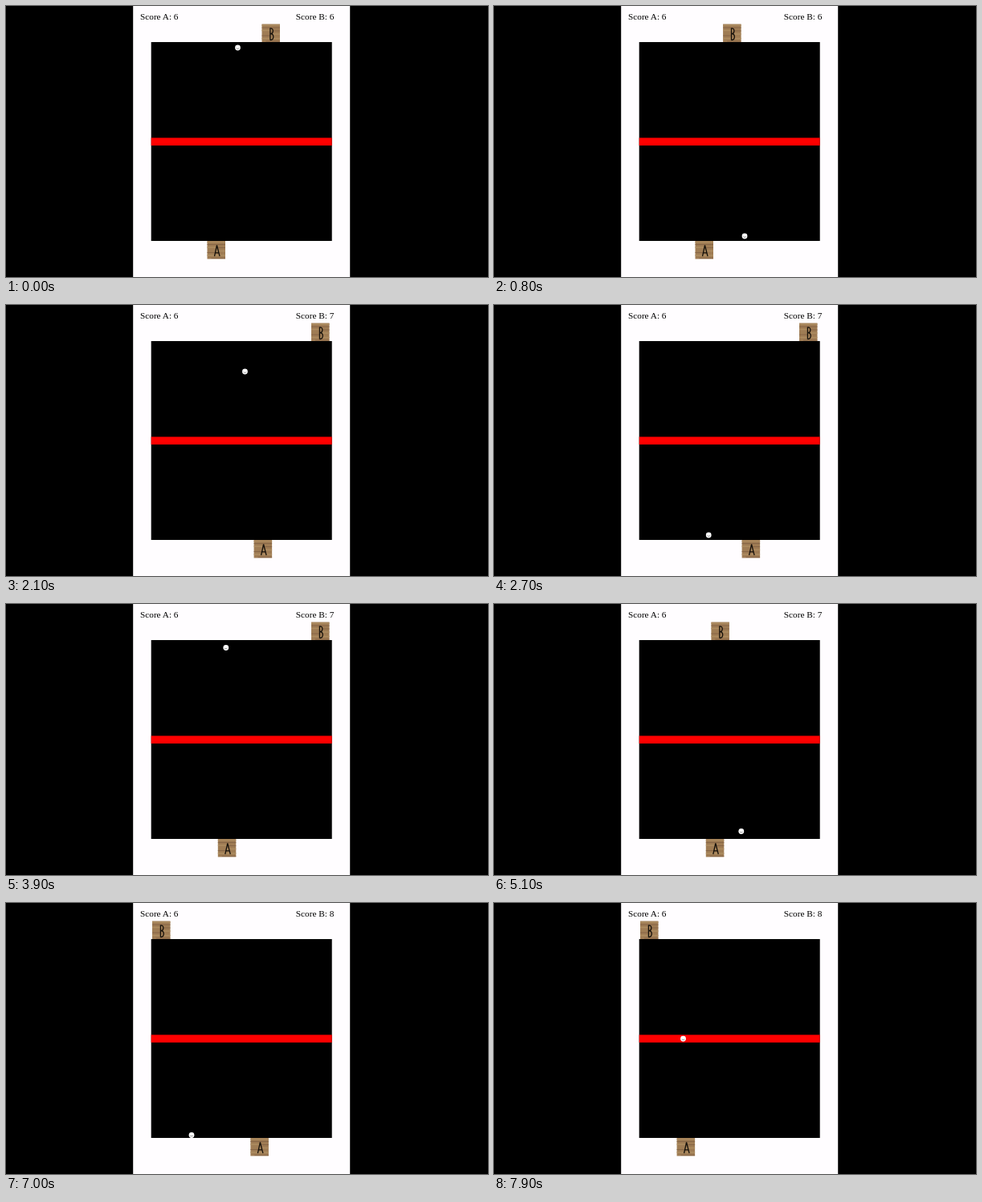
An HTML page for the animation above (8 s loop, 600x338 px).

```html
<!DOCTYPE html>
<html lang="en">
<head>
<meta charset="utf-8">
<title>Paddle game</title>
<style>
  html, body { margin: 0; height: 100%; overflow: hidden; background: #000; }
  svg { display: block; width: 100%; height: 100%; }
  text { font: 11.25px "Liberation Serif", serif; }
  .letter { fill: none; stroke: #15100a; stroke-width: 1.3; }
</style>
</head>
<body>
<svg viewBox="0 0 600 338">
  <defs>
    <g id="wood">
      <rect width="22.5" height="22.5" fill="#9f7c54"/>
      <path d="M0 1.5H22.5M0 8H13M10 12.5H22.5M0 18H22.5" stroke="#ae8d61" stroke-width="1.6"/>
      <path d="M0 4.5H22.5M12 8.5H22.5M0 14.5H10M5 21.5H22.5" stroke="#866546"/>
    </g>
  </defs>
  <rect x="158.2" width="270" height="338" fill="#fffdff"/>
  <rect x="180.7" y="45" width="225" height="248"/>
  <rect x="180.7" y="164.4" width="225" height="9.6" fill="#f00"/>
  <text x="167" y="17">Score A: 6</text>
  <text x="360.8" y="17" id="score"></text>
  <g id="tileA">
    <use href="#wood"/>
    <path class="letter" d="M9 19.2L12 5.5L15.5 19.2M10 14.8H14.5"/>
  </g>
  <g id="tileB">
    <use href="#wood"/>
    <path class="letter" d="M10.4 20V5.5C15 4.5 15 12 10.4 12C15.6 11.5 15.6 20 10.4 20"/>
  </g>
  <g id="ball">
    <circle r="3.4" fill="#fff"/>
    <path d="M-1.8 .7Q0 2.2 1.8 .7" fill="none" stroke="#777" stroke-width=".8"/>
  </g>
</svg>
<script>
const LOOP = 8000, STEP = 100, GRIP = 3.4;

// Each shot flies straight to (x, y); a missed ball sends the tile to `miss`.
const shots = [
  { launch: 0, land: 800, x: 312, y: 287 },
  { launch: 1200, land: 2000, x: 302.5, y: 49 },
  { launch: 2000, land: 2700, x: 267.2, y: 287, miss: 380 },
  { launch: 3100, land: 3900, x: 273.8, y: 54.5 },
  { launch: 4400, land: 5100, x: 307.8, y: 283.5 },
  { launch: 5600, land: 6300, x: 252, y: 49 },
  { launch: 6300, land: 7000, x: 231, y: 289.5, miss: 182 },
  { launch: 7500, land: 8300, x: 240, y: 49 }
];

const el = id => document.getElementById(id);
const move = (id, x, y) => el(id).setAttribute("transform", `translate(${x} ${y})`);

function draw(now) {
  const t = Math.floor(now % LOOP / STEP) * STEP;
  let x = 288.5, y = 52, tileA = 250.5, tileB = 318.5, score = 6;
  for (const s of shots) {
    if (t <= s.launch) break;
    const tile = s.miss ?? x - GRIP;
    if (s.y > y) tileB = tile; else tileA = tile;
    if (s.miss) score++;
    const p = Math.min(1, (t - s.launch) / (s.land - s.launch));
    x += (s.x - x) * p;
    y += (s.y - y) * p;
  }
  move("ball", x, y);
  move("tileA", tileA, 293);
  move("tileB", tileB, 22.5);
  el("score").textContent = "Score B: " + score;
}

const start = performance.now();
function tick() {
  draw(performance.now() - start);
  requestAnimationFrame(tick);
}
tick();
</script>
</body>
</html>
```
